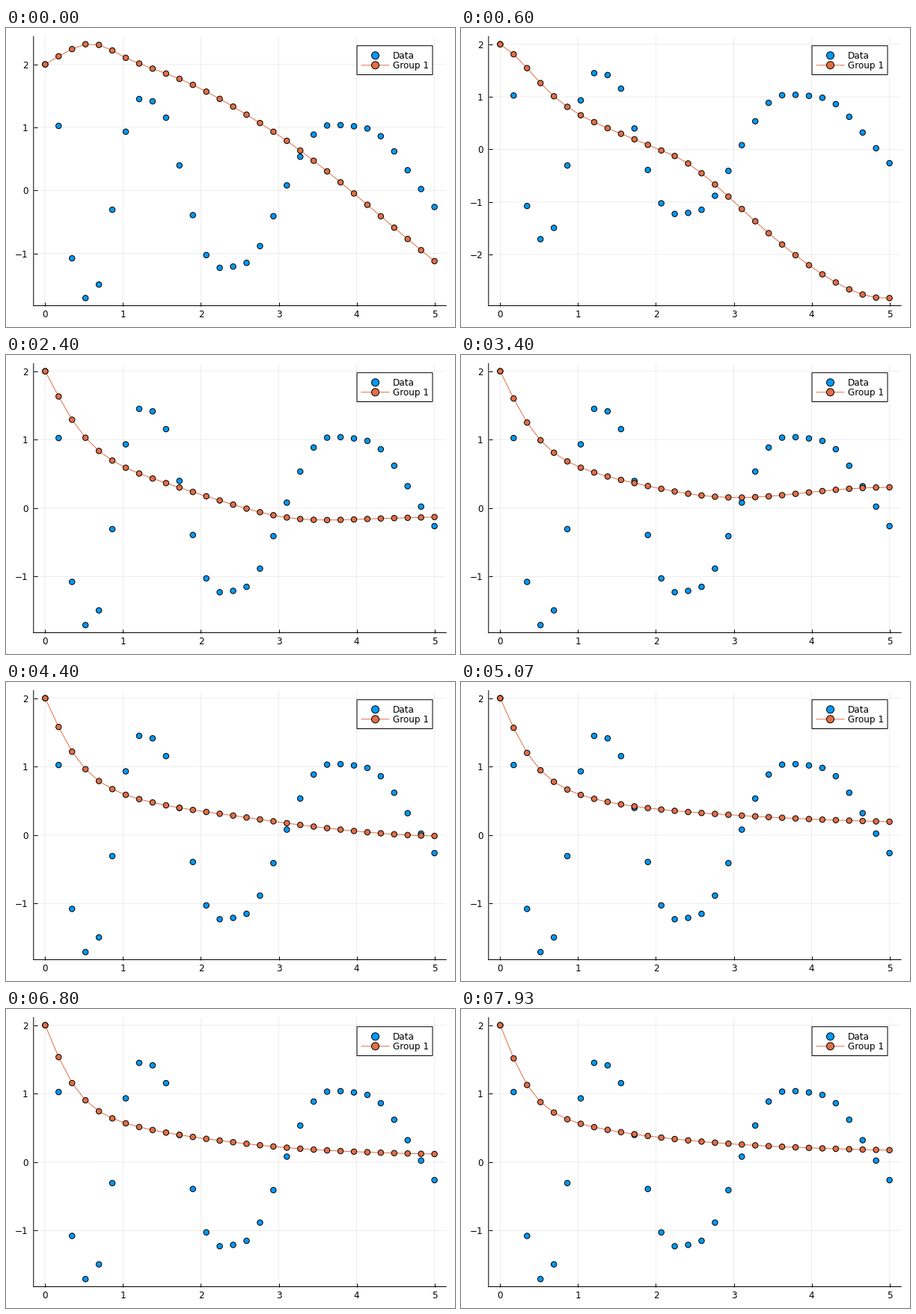
Animation of 600 by 400 pixels, one loop 8 s. Source, as a matplotlib script:

```python
import numpy as np
import matplotlib.pyplot as plt
from matplotlib.animation import FuncAnimation
from matplotlib.patches import Rectangle

plt.rcParams["path.snap"] = False

W, H, DPI = 600, 400, 100
FRAMES, LOOP_MS = 120, 8000
PT = 72 / DPI
BLUE, ORANGE = "#009AFA", "#E26F46"
LEFT, RIGHT, TOP, BOTTOM = 36.8, 588.2, 11.5, 371.5
FONT = dict(family="DejaVu Sans", size=12 * PT)

N = 30
t = np.linspace(0, 5, N)


def spiral(steps=100):
    """Sample the cubic spiral ODE with RK4 and return its first component."""
    A = np.array([[-0.1, 2.0], [-2.0, -0.1]])
    rate = lambda u: (u ** 3) @ A
    h = (t[1] - t[0]) / steps
    u, out = np.array([2.0, 0.0]), [2.0]
    for _ in range(N - 1):
        for _ in range(steps):
            k1 = rate(u)
            k2 = rate(u + h / 2 * k1)
            k3 = rate(u + h / 2 * k2)
            k4 = rate(u + h * k3)
            u = u + h / 6 * (k1 + 2 * k2 + 2 * k3 + k4)
        out.append(u[0])
    return np.array(out)


def smooth(x, xs, ys):
    """Cubic curve through a few key points."""
    xs, ys = np.array(xs, float), np.array(ys, float)
    m = np.gradient(ys, xs)
    i = np.clip(np.searchsorted(xs, x, side="right") - 1, 0, len(xs) - 2)
    h = xs[i + 1] - xs[i]
    s = (x - xs[i]) / h
    return ((1 + 2 * s) * (1 - s) ** 2 * ys[i] + s * (1 - s) ** 2 * h * m[i]
            + s * s * (3 - 2 * s) * ys[i + 1] + s * s * (s - 1) * h * m[i + 1])


def training():
    """Fitted curve at every step: settled shape plus three fading modes."""
    settled = (.14 + .73 * np.exp(-.58 * t)
               + 1.13 * np.exp(-(t / .326) ** 1.22))
    untrained = smooth(t, [0, .345, .517, .69, 1.03, 1.9, 2.93, 5],
                       [2, 2.243, 2.32, 2.309, 2.107, 1.673, .932, -1.122])

    x = t / .38
    bump = (x * np.exp(1 - x)) ** 1.5
    sag = np.exp(-((t - 3) / 1.25) ** 2)
    r = np.clip((t - 2.2) / 2.8, 0, 1)
    tail = r * r * (3 - 2 * r)

    # Mode strengths swing about zero and die out as training goes on.
    n = np.arange(FRAMES)
    key = [0, 4, 13, 21, 36, 43, 51, 66, 78, 87, 104, 119]
    a = .21 * (1 - n / 119) + .5 * np.exp(-n / 12)
    b = smooth(n, key, [0, -1, -.1, -.08, -.33, -.24,
                        -.14, -.04, .03, .045, -.04, 0])
    c = smooth(n, key, [0, -5, .3, .66, -.285, -.03,
                        .135, -.189, .045, .075, -.067, 0])
    fit = settled + np.outer(a, bump) + np.outer(b, sag) + np.outer(c, tail)
    w = np.clip(1 - n / 6, 0, 1)[:, None] ** 2
    return w * untrained + (1 - w) * fit


curves, data = training(), spiral()

fig = plt.figure(figsize=(W / DPI, H / DPI), dpi=DPI, facecolor="white")
ax = fig.add_axes([0, 0, 1, 1])
ax.set_xlim(-.15, 5.15)
ax.spines[["top", "right"]].set_visible(False)
ax.spines[["left", "bottom"]].set_linewidth(PT)
ax.set_axisbelow(True)
ax.grid(color="black", alpha=.07, linewidth=PT)
ax.tick_params(direction="in", length=5 * PT, width=PT, pad=7.3 * PT)
ax.tick_params(axis="x", pad=5.8 * PT)
ax.set_xticks(range(6), [str(i) for i in range(6)], **FONT)


def dots(axes, x, y, size, colors):
    return axes.scatter(x, y, s=(size * PT) ** 2, c=colors, zorder=3,
                        edgecolors="black", linewidths=PT)


dots(ax, t, data, 7.4, [BLUE] * N)
line, = ax.plot(t, curves[0], color=ORANGE, linewidth=PT, zorder=3)
marks = dots(ax, t, curves[0], 7.4, [ORANGE] * N)

# Legend in pixel coordinates.
legend = fig.add_axes([0, 0, 1, 1])
legend.add_patch(Rectangle((469, 23.7), 101, 38.8, facecolor="white",
                           edgecolor="black", linewidth=PT))
rows = [36.8, 49.8]
legend.plot([475, 512], [rows[1]] * 2, color=ORANGE, linewidth=PT)
dots(legend, [493.5] * 2, rows, 10, [BLUE, ORANGE])
for y, label in zip(rows, ("Data", "Group 1")):
    legend.text(517, y + 4.4, label, va="baseline", **FONT)
legend.set(xlim=(0, W), ylim=(H, 0))
legend.axis("off")


def update(frame):
    y = curves[frame]
    lo, hi = min(data.min(), y.min()), max(data.max(), y.max())
    margin = .03 * (hi - lo)
    lo, hi = lo - margin, hi + margin
    span = hi - lo
    step = 1 if span < 5.3 else 2 if span < 6.7 else 2.5
    wide = step == 2.5
    ticks = np.arange(np.ceil(lo / step), np.floor(hi / step) + 1) * step + 0.0
    labels = [f"{v:.{int(wide)}f}".replace("-", "\u2212") for v in ticks]
    left = LEFT + 11 * wide
    ax.set_position([left / W, 1 - BOTTOM / H,
                     (RIGHT - left) / W, (BOTTOM - TOP) / H])
    ax.set_yticks(ticks, labels, **FONT)
    ax.set_ylim(lo, hi)
    line.set_ydata(y)
    marks.set_offsets(np.column_stack([t, y]))
    return line, marks


anim = FuncAnimation(fig, update, frames=FRAMES, interval=LOOP_MS / FRAMES,
                     repeat=True, repeat_delay=0, blit=False)
plt.show()
```
